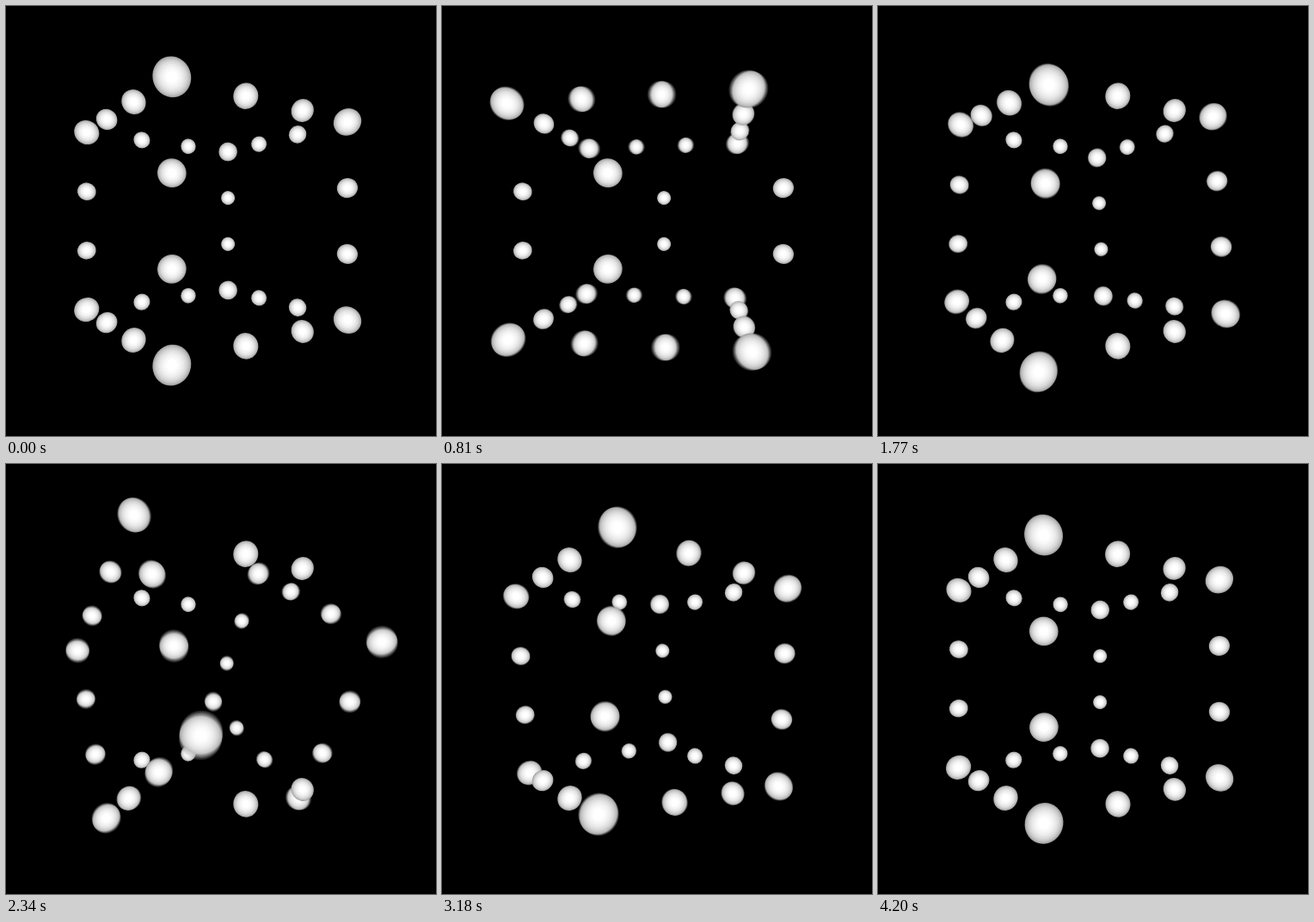
Recreate the animation shown at these times as an HTML page with a canvas. Size 500 by 500 pixels, loop 4230 ms.

```html
<!DOCTYPE html>
<html lang="en">
<head>
<meta charset="utf-8">
<title>Turning cube of spheres</title>
<style>
  html, body { margin: 0; height: 100%; overflow: hidden; background: #000; }
  canvas { display: block; }
</style>
</head>
<body>
<canvas id="stage" width="500" height="500"></canvas>
<script>
const SIZE = 500, FOCAL = SIZE / 2 / Math.tan(Math.PI / 6);
const FRAME_MS = 30, PHASE_FRAMES = 47, HOLD_FRAMES = 7;
const SAMPLES = 5, SHUTTER = 0.6;
const HALF = 1.5, DISTANCE = 5.98, SHIFT_X = -0.18;
const COS = Math.cos(Math.PI / 5), SIN = Math.sin(Math.PI / 5);

const screen = document.getElementById('stage').getContext('2d');
const layer = document.createElement('canvas');
layer.width = layer.height = SIZE;
const ctx = layer.getContext('2d');

// Lit from the viewer: half ambient, half diffuse.
const shade = ctx.createRadialGradient(0, 0, 0, 0, 0, 1);
for (let i = 0; i <= 20; i++) {
  const rho = Math.sin(i / 20 * Math.PI / 2);
  const v = Math.min(255, Math.round(128 + 128 * Math.sqrt(1 - rho * rho)));
  shade.addColorStop(rho, `rgb(${v},${v},${v})`);
}

// Points on the cube's edges, as [right, front, up].
const balls = [];
const steps = [-HALF, -0.5, 0.5, HALF];
for (const x of steps) for (const z of steps) for (const y of steps) {
  const pos = [x, z, y];
  const outer = pos.filter(c => Math.abs(c) === HALF).length;
  if (outer > 1) balls.push({ pos, r: outer === 3 ? 0.2 : 0.15 });
}

const ease = p => p * p * (3 - 2 * p);

// Opposite faces across the axis turn in opposite directions.
function turn(pos, axis, angle) {
  if (Math.abs(pos[axis]) !== HALF) return pos;
  const a = (axis + 1) % 3, b = (axis + 2) % 3;
  const c = Math.cos(angle), s = Math.sin(angle) * Math.sign(pos[axis]);
  const out = [...pos];
  out[a] = pos[a] * c - pos[b] * s;
  out[b] = pos[a] * s + pos[b] * c;
  return out;
}

function toCamera([x, z, y]) {
  return { x: SHIFT_X + COS * x + SIN * z, y: -y, d: DISTANCE + SIN * x - COS * z };
}

// A sphere in perspective is an ellipse stretched away from the centre.
function drawBall({ x, y, d, r }) {
  const q = d * d - r * r, k = FOCAL * d / q;
  const minor = FOCAL * r / Math.sqrt(q);
  const major = minor * Math.sqrt((x * x + y * y + q) / q);
  ctx.save();
  ctx.translate(SIZE / 2 + x * k, SIZE / 2 + y * k);
  ctx.rotate(Math.atan2(y, x));
  ctx.scale(major, minor);
  ctx.beginPath();
  ctx.arc(0, 0, 1, 0, 2 * Math.PI);
  ctx.fillStyle = shade;
  ctx.fill();
  ctx.restore();
}

function drawScene(axis, angle) {
  ctx.fillStyle = '#000';
  ctx.fillRect(0, 0, SIZE, SIZE);
  balls.map(({ pos, r }) => ({ ...toCamera(turn(pos, axis, angle)), r }))
    .sort((a, b) => b.d - a.d)
    .forEach(drawBall);
}

function render(ms) {
  const tick = Math.floor(ms / FRAME_MS) % (3 * PHASE_FRAMES);
  const axis = (Math.floor(tick / PHASE_FRAMES) + 2) % 3;
  const moved = tick % PHASE_FRAMES - HOLD_FRAMES;
  screen.globalCompositeOperation = 'source-over';
  screen.globalAlpha = 1;
  screen.fillStyle = '#000';
  screen.fillRect(0, 0, SIZE, SIZE);
  // Motion blur: average several moments of the open shutter.
  screen.globalCompositeOperation = 'lighter';
  screen.globalAlpha = 1 / SAMPLES;
  for (let i = 0; i < SAMPLES; i++) {
    const p = (moved + i * SHUTTER / SAMPLES) / (PHASE_FRAMES - HOLD_FRAMES);
    drawScene(axis, ease(Math.max(0, p)) * Math.PI / 2);
    screen.drawImage(layer, 0, 0);
  }
}

let start;
function loop(now) {
  start ??= now;
  render(now - start);
  requestAnimationFrame(loop);
}
requestAnimationFrame(loop);
</script>
</body>
</html>
```
